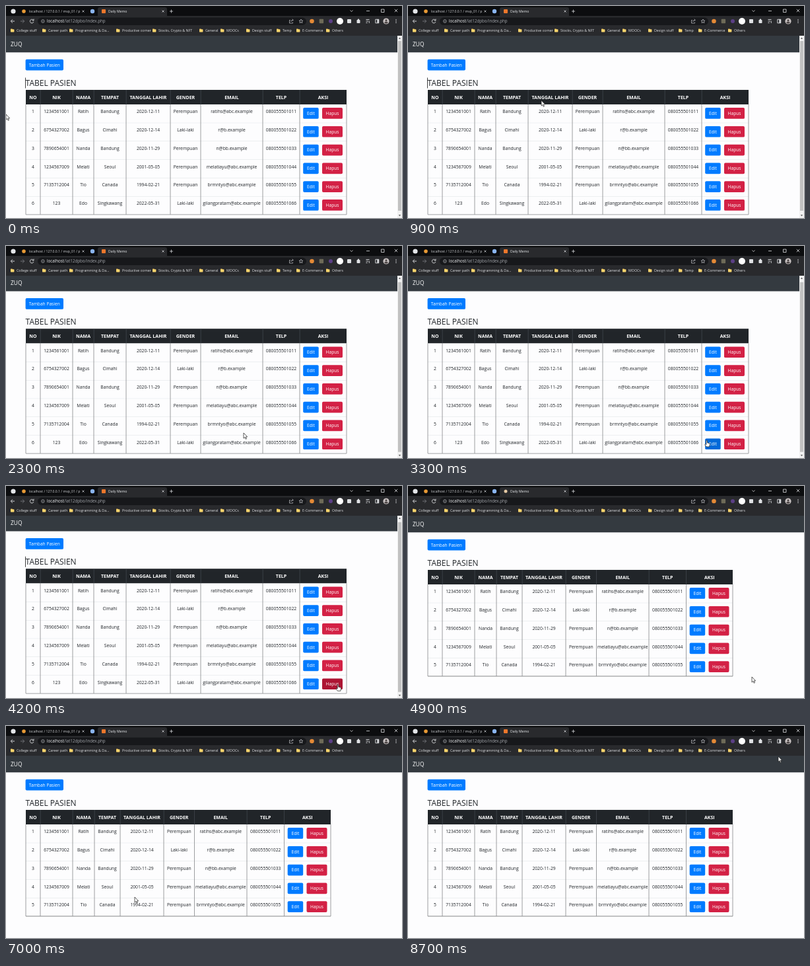
Write an HTML page with a canvas that moves like this. It is 600 by 321 pixels and loops after 8800 ms.

```html
<!DOCTYPE html>
<html lang="id">
<head>
<meta charset="utf-8">
<title>Tabel Pasien</title>
<style>
html, body { margin: 0; width: 100%; height: 100%; overflow: hidden; background: #fdfdfe; }
canvas { display: block; width: 100vw; height: 100vh; }
</style>
</head>
<body>
<canvas id="stage" width="600" height="321"></canvas>
<script>
const ctx = document.getElementById('stage').getContext('2d');
const LOOP = 8800, STEP = 100, DELETED_AT = 4600;
const INK = '#212529', BLUE = '#007bff', RED = '#d32145', TOOLBAR = '#292a2d';

const HEAD = ['NO', 'NIK', 'NAMA', 'TEMPAT', 'TANGGAL LAHIR', 'GENDER', 'EMAIL', 'TELP', 'AKSI'];
const PATIENTS = [
  ['1', '1234561001', 'Ratih', 'Bandung', '2020-12-11', 'Perempuan', 'ratihs@abc.example', '080055501011'],
  ['2', '6754327002', 'Bagus', 'Cimahi', '2020-12-14', 'Laki-laki', 'r@b.example', '080055501022'],
  ['3', '7890654001', 'Nanda', 'Bandung', '2020-11-29', 'Perempuan', 'n@bb.example', '080055501033'],
  ['4', '1234567009', 'Melati', 'Seoul', '2001-05-05', 'Perempuan', 'melatiayu@abc.example', '080055501044'],
  ['5', '7135712004', 'Tio', 'Canada', '1994-02-21', 'Perempuan', 'brmntyo@abc.example', '080055501055'],
  ['6', '123', 'Edo', 'Singkawang', '2022-05-31', 'Laki-laki', 'gilangpratam@abc.example', '080055501066'],
];
const WIDE_EDGES = [30, 52, 101, 133, 182, 249, 295, 389, 445, 516];
const NARROW_EDGES = [30, 52, 101, 134, 173, 239, 285.5, 365, 421.5, 492];
const BOOKMARKS = [['College stuff', 16], ['Career path', 64], ['Programming & Da...', 105],
  ['Productive corner', 176], ['Stocks, Crypto & NFT', 231], ['General', 302], ['MOOCs', 334],
  ['Design stuff', 373], ['Temp', 419], ['E-Commerce', 449], ['Others', 494]];

// Pointer stops: time, x, y
const POINTER = [[0, 0, 164], [300, 0, 164], [1500, 404, 122], [1700, 404, 122], [2300, 360, 283],
  [2700, 360, 283], [3700, 503, 301], [4600, 503, 301], [4900, 521, 289], [5500, 521, 289],
  [6900, 195, 259], [7200, 195, 259], [8600, 561, 46], [LOOP, 561, 46]];

function pointerAt(t) {
  const i = POINTER.findIndex(p => p[0] > t);
  const [t0, x0, y0] = POINTER[i - 1], [t1, x1, y1] = POINTER[i];
  const u = (t - t0) / (t1 - t0), ease = u * u * (3 - 2 * u);
  return { x: x0 + (x1 - x0) * ease, y: y0 + (y1 - y0) * ease };
}

function rect(x, y, w, h, color, radius = 0) {
  ctx.fillStyle = color;
  ctx.beginPath();
  ctx.roundRect(x, y, w, h, radius);
  ctx.fill();
}

function dot(x, y, r, color) {
  ctx.fillStyle = color;
  ctx.beginPath();
  ctx.arc(x, y, r, 0, 7);
  ctx.fill();
}

function stroke(path, color, width = 0.9) {
  ctx.strokeStyle = color;
  ctx.lineWidth = width;
  ctx.stroke(new Path2D(path));
}

function fill(path, color) {
  ctx.fillStyle = color;
  ctx.fill(new Path2D(path));
}

// y is the middle of the capitals
function text(string, x, y, size, color, align = 'left', weight = 400) {
  ctx.font = `${weight} ${size}px "Open Sans", "Noto Sans", sans-serif`;
  ctx.textAlign = align;
  ctx.fillStyle = color;
  ctx.fillText(string, x, y + size * 0.36);
}

function cross(x, y, r, color) {
  stroke(`M${x - r} ${y - r}l${2 * r} ${2 * r}m0 ${-2 * r}l${-2 * r} ${2 * r}`, color, 0.8);
}

function drawBrowser(loading) {
  rect(0, 0, 600, 16, '#0c0d0f');
  rect(0, 15, 600, 30, TOOLBAR);
  rect(139, 2, 105, 16, TOOLBAR, 3);

  dot(11, 8, 3.6, '#e4e6e9');
  dot(27, 8, 2.8, '#e89a35');
  text('localhost / 127.0.0.1 / mvp_01 / p', 35, 8, 5.05, '#d5d7da');
  cross(117, 8, 1.5, '#c5c7ca');
  dot(131, 8, 3.2, '#8ab4f0');
  if (loading) dot(148, 8, 2.5, '#e5c9a4');
  else rect(145, 5, 6, 6, '#ee772b', 1);
  text('Daily Memo', 155, 8, 5.1, '#eceef0');
  cross(238, 8, 1.5, '#d5d7da');
  stroke('M248 8h5M250.5 5.5v5', '#d5d7da', 0.8);
  stroke('M521.5 6.5l2 2 2-2M546 7.5h5M568.5 5h4.5v4.5h-4.5z', '#e0e1e4', 0.8);
  cross(591, 7, 2.2, '#e0e1e4');

  stroke('M13 23H7.5m2.5-2.7L7.3 23l2.7 2.7', '#dfe1e4');
  stroke('M22 23h5.5m-2.5-2.7l2.7 2.7-2.7 2.7', '#77797d');
  stroke('M41.6 21.6a2.8 2.8 0 1 0 .3 2.3M42 19.6v2.4h-2.4', '#dfe1e4');
  rect(48, 17.5, 407, 11.5, '#17181b', 6);
  stroke('M58.2 23a2.3 2.3 0 1 0-4.6 0a2.3 2.3 0 1 0 4.6 0M55.9 22.7v1.5M55.9 21.4v.5', '#b9bcc0', 0.7);
  text('localhost', 62, 23, 6.2, '#f1f2f4');
  const hostWidth = ctx.measureText('localhost').width;
  text('/lat12dpbo/index.php', 62 + hostWidth, 23, 6.2, '#a4a7ac');

  stroke('M431 21.5h-1.5v4.5h5v-1.5M431.5 24q.4-2.8 3.5-2.8m-1.3-1.6l1.6 1.6-1.6 1.6', '#c6c8cc', 0.7);
  stroke('M447 20l.9 2 2.1.2-1.6 1.4.5 2.1-1.9-1.1-1.9 1.1.5-2.1-1.6-1.4 2.1-.2z', '#c6c8cc', 0.7);
  dot(463.5, 23, 3.3, '#e58a36');
  rect(474.7, 19.8, 6.4, 6.4, '#6e6b58', 1);
  dot(492, 23, 3, '#5b3f86');
  dot(506, 23, 5, '#ffffff');
  rect(517, 20, 6, 6, '#dfe1e4', 1);
  rect(531.5, 21, 5, 5, '#dfe1e4', 0.8);
  dot(534, 20.7, 1.2, '#dfe1e4');
  stroke('M545.5 20.5h5M545.5 23h3.5M545.5 25.5h2M550.3 22.5v3.4', '#dfe1e4', 0.9);
  stroke('M559.8 20.3h5v5.5h-5z', '#dfe1e4', 0.9);
  rect(562.4, 20.3, 2.4, 5.5, '#dfe1e4');
  dot(576, 23, 4.6, '#c8c2c2');
  dot(576, 21.7, 1.5, '#4b4545');
  rect(573.5, 23.8, 5, 2.8, '#4b4545', 1.4);
  [20.7, 23, 25.3].forEach(y => dot(591, y, 0.7, '#dfe1e4'));

  for (const [label, x] of BOOKMARKS) {
    rect(x - 9, 34.6, 2.8, 2, '#e9bd4d', 0.5);
    rect(x - 9, 35.3, 5.4, 4.1, '#fbd56d', 0.6);
    text(label, x, 37, 5.3, '#e0e2e5');
  }
}

function button(label, x, y, w, color, hoverColor, pointer) {
  const over = pointer.x > x && pointer.x < x + w && pointer.y > y && pointer.y < y + 16.7;
  rect(x, y, w, 16.7, over ? hoverColor : color, 1.9);
  text(label, x + w / 2, y + 8.4, 6.65, '#ffffff', 'center');
  return over;
}

function drawTable(edges, rows, pointer) {
  const left = edges[0], right = edges[9], top = 127, headBottom = 149, rowHeight = 27.8;
  const bottom = headBottom + rows.length * rowHeight;
  const middle = i => (edges[i] + edges[i + 1]) / 2;
  let over = false;

  rect(left, top, right - left, headBottom - top, INK);
  HEAD.forEach((label, i) => text(label, middle(i), 138, 7, '#ffffff', 'center', 700));

  rows.forEach((row, r) => {
    const y = headBottom + r * rowHeight;
    if (r) rect(left, y, right - left, 0.5, '#dee2e6');
    row.forEach((cell, i) => text(cell, middle(i), y + 10.8, 6.75, INK, 'center'));
    const x = edges[8] + 5.2;
    over = button('Edit', x, y + 5.1, 23.5, BLUE, '#0069d9', pointer) || over;
    over = button('Hapus', x + 28.8, y + 5.1, 31, RED, '#ad1533', pointer) || over;
  });

  edges.forEach((x, i) => {
    if (i && i < 9) rect(x - 0.2, top, 0.6, headBottom - top, '#4a5158');
    rect(x - 0.4, headBottom, 0.8, bottom - headBottom, '#85878a');
  });
  rect(left, bottom - 0.4, right - left, 0.8, '#85878a');
  return over;
}

function drawScrollbar(scroll) {
  rect(593, 45, 7, 276, '#f1f1f1');
  rect(594, 53 + scroll, 5, 257, '#c1c1c1');
  fill('M594.8 50l1.7-2.4 1.7 2.4z', '#6a6a6a');
  fill('M594.8 316l1.7 2.4 1.7-2.4z', '#6a6a6a');
}

function drawPointer({ x, y }, hand) {
  ctx.save();
  ctx.translate(x, y);
  ctx.lineJoin = 'round';
  const shape = hand
    ? 'M-.8 0q.8-.9 1.6 0v3.2l3.2.9q.8.3.7 1.2l-.7 4H-.6L-3 6q.3-1.2 2.2 0z'
    : 'M0 0v8.2l1.9-1.7 1.3 2.9 1.3-.6-1.3-2.8h2.5z';
  fill(shape, '#ffffff');
  stroke(shape, '#1b1b1b', 0.7);
  ctx.restore();
}

function draw(t) {
  const deleted = t >= DELETED_AT;
  const scroll = deleted ? 0 : 1.7 * Math.min(1, Math.max(0, (t - 1700) / 300));
  const pointer = pointerAt(t);
  const pagePointer = { x: pointer.x, y: pointer.y + scroll };

  rect(0, 0, 600, 321, '#fdfdfe');
  ctx.save();
  ctx.translate(0, -scroll);
  rect(0, 44, 600, 26.3, '#343a40');
  text('ZUQ', 7, 58, 8.4, '#ffffff');
  let over = button('Tambah Pasien', 29.6, 80.8, 57.4, BLUE, '#0069d9', pagePointer);
  text('TABEL PASIEN', 29.6, 116.6, 12, INK);
  if (!deleted && (t + 430) % 1060 < 530) rect(29.2, 108.5, 0.8, 16, '#111111');
  over = drawTable(deleted ? NARROW_EDGES : WIDE_EDGES,
    deleted ? PATIENTS.slice(0, 5) : PATIENTS, pagePointer) || over;
  ctx.restore();

  if (!deleted) drawScrollbar(scroll);
  drawBrowser(deleted && t < 5100);
  drawPointer(pointer, over);
}

function frame() {
  draw(Math.floor(performance.now() % LOOP / STEP) * STEP);
  requestAnimationFrame(frame);
}
frame();
</script>
</body>
</html>
```
